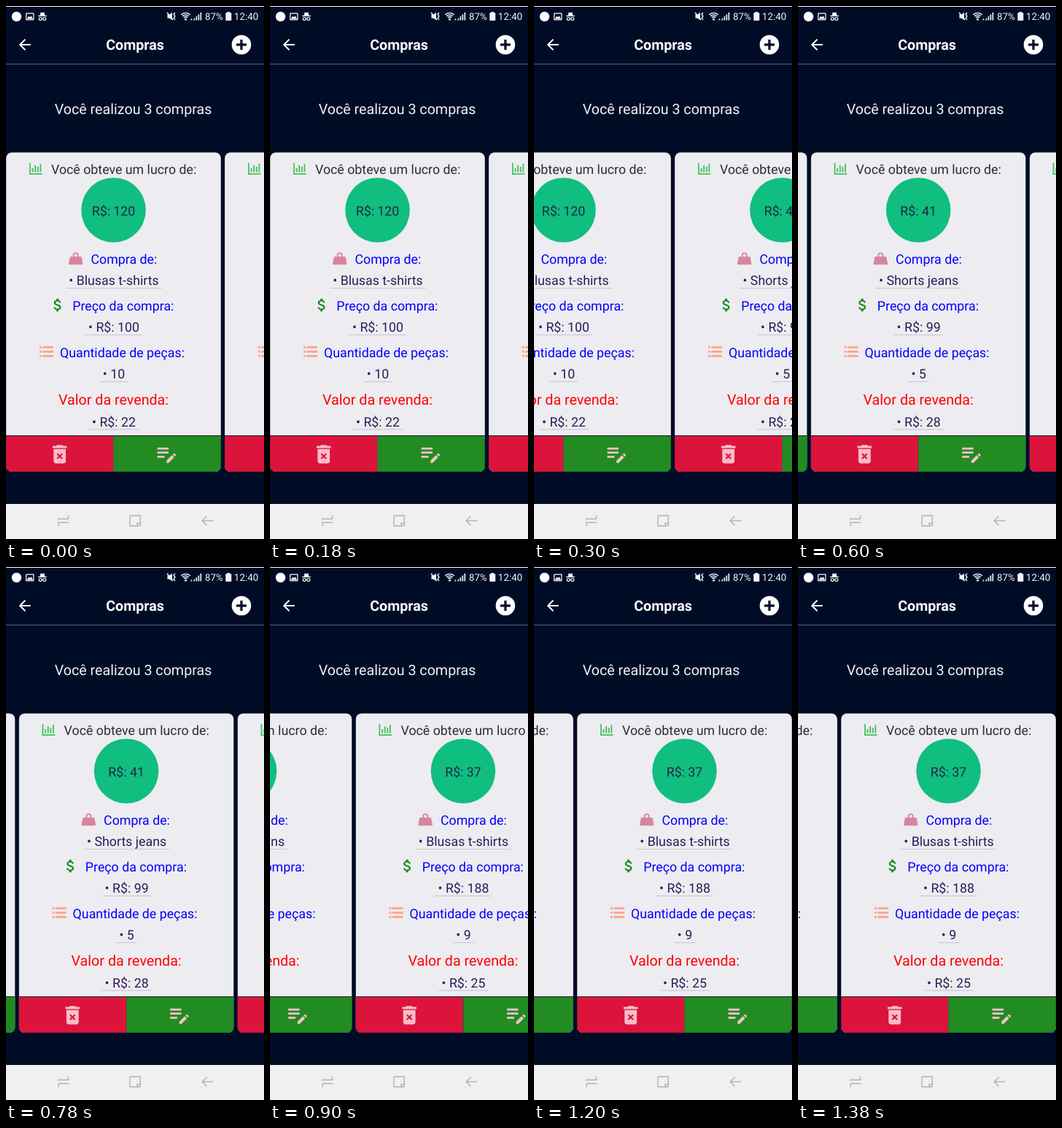
Recreate the animation shown at these times as an HTML page with a canvas. Size 354 px wide and 730 px high, loop 1.5 s.

```html
<!DOCTYPE html>
<html lang="pt-BR">
<head>
<meta charset="utf-8">
<title>Compras</title>
<style>
  html, body { margin: 0; width: 100%; height: 100%; overflow: hidden; background: #000c26; }
  canvas { display: block; width: 354px; height: 730px; }
</style>
</head>
<body>
<canvas id="stage"></canvas>
<script>
const W = 354, H = 730, STEP = 300, PITCH = 300, CARD_W = 295;
const SCROLL = [0, 107, 282.4, 482.5, 541];
const NAVY = '#000c26', INK = '#2f1a55', BLUE = '#0000ff';
const CARDS = [
  { profit: 120, item: 'Blusas t-shirts', price: 100, count: 10, resale: 22 },
  { profit: 41, item: 'Shorts jeans', price: 99, count: 5, resale: 28 },
  { profit: 37, item: 'Blusas t-shirts', price: 188, count: 9, resale: 25 }
];

// Icons on a 24-unit grid
const BACK = new Path2D('M20 11H7.83l5.59-5.59L12 4l-8 8 8 8 1.41-1.41L7.83 13H20v-2z');
const MONEY = new Path2D('M11.8 10.9c-2.27-.59-3-1.2-3-2.15 0-1.09 1.01-1.85 2.7-1.85 1.78 0 2.44.85 2.5 2.1h2.21c-.07-1.72-1.12-3.3-3.21-3.81V3h-3v2.16c-1.94.42-3.5 1.68-3.5 3.61 0 2.31 1.91 3.46 4.7 4.13 2.5.6 3 1.48 3 2.41 0 .69-.49 1.79-2.7 1.79-2.06 0-2.87-.92-2.98-2.1h-2.2c.12 2.19 1.76 3.42 3.68 3.83V21h3v-2.15c1.95-.37 3.5-1.5 3.5-3.55 0-2.84-2.43-3.81-4.7-4.4z');
const TRASH = new Path2D('M6 19c0 1.1.9 2 2 2h8c1.1 0 2-.9 2-2V7H6zM19 4h-3.5l-1-1h-5l-1 1H5v2h14z');
const EDIT = new Path2D('M3 10h11v2H3zM3 6h11v2H3zM3 14h7v2H3zM18.01 12.87l.71-.71c.39-.39 1.02-.39 1.41 0l.71.71c.39.39.39 1.02 0 1.41l-.71.71zM17.3 13.58l-5.3 5.3V21h2.12l5.3-5.3z');
const BAG = new Path2D('M3 6h13.4c.8 0 1.2.4 1.4 1.2L19.4 15.4c.2 1-.3 1.6-1.1 1.6H1.1c-.8 0-1.3-.6-1.1-1.6L1.6 7.2C1.8 6.4 2.200 6 3 6z');

const canvas = document.getElementById('stage');
const ctx = canvas.getContext('2d');
const dpr = window.devicePixelRatio || 1;
canvas.width = W * dpr;
canvas.height = H * dpr;

function rect(x, y, w, h, color) {
  ctx.fillStyle = color;
  ctx.fillRect(x, y, w, h);
}

function roundRect(x, y, w, h, r, color) {
  ctx.fillStyle = color;
  ctx.beginPath();
  ctx.roundRect(x, y, w, h, r);
  ctx.fill();
}

function disc(x, y, r, color) {
  ctx.fillStyle = color;
  ctx.beginPath();
  ctx.arc(x, y, r, 0, Math.PI * 2);
  ctx.fill();
}

function arc(x, y, r, from, to, width, color) {
  ctx.strokeStyle = color;
  ctx.lineWidth = width;
  ctx.beginPath();
  ctx.arc(x, y, r, from * Math.PI, to * Math.PI);
  ctx.stroke();
}

function line(points, width, color) {
  ctx.strokeStyle = color;
  ctx.lineWidth = width;
  ctx.beginPath();
  points.forEach(([x, y]) => ctx.lineTo(x, y));
  ctx.stroke();
}

function poly(points, color) {
  ctx.fillStyle = color;
  ctx.beginPath();
  points.forEach(([x, y]) => ctx.lineTo(x, y));
  ctx.fill();
}

function icon(path, x, y, scale, color) {
  ctx.save();
  ctx.translate(x, y);
  ctx.scale(scale, scale);
  ctx.fillStyle = color;
  ctx.fill(path);
  ctx.restore();
}

function text(str, x, y, color, size = 17.8, align = 'left', weight = 400) {
  ctx.font = `${weight} ${size}px Roboto, sans-serif`;
  ctx.textAlign = align;
  ctx.fillStyle = color;
  ctx.fillText(str, x, y);
}

function value(str, y) {
  const label = '• ' + str;
  text(label, 148, y, INK, 17.8, 'center');
  const w = ctx.measureText(label).width + 8;
  rect(148 - w / 2, y + 4, w, 1, '#c6c6cf');
}

function chartIcon() {
  const c = '#48c45c';
  rect(32, 215, 1.8, 16, c);
  rect(32, 229.2, 17.5, 1.8, c);
  [5.5, 9.5, 7.5, 11.5].forEach((h, i) =>
    rect(35.6 + i * 3.6, 227.6 - h, 1.9, h, c));
}

function bagIcon() {
  const c = '#d9849f';
  icon(BAG, 86, 337.2, 1, c);
  arc(95.7, 341.4, 3, 1, 2, 1.9, c);
  rect(91.8, 341.2, 1.9, 3, c);
  rect(97.8, 341.2, 1.9, 3, c);
}

function listIcon() {
  for (let y = 466; y < 482; y += 6) {
    rect(46, y, 2.9, 2.8, '#ffa48c');
    rect(50.3, y, 14.8, 2.8, '#ffa48c');
  }
}

function buttons() {
  const half = CARD_W / 2;
  rect(0, 588, half, 50, '#dc143c');
  rect(half, 588, half, 50, '#228b22');
  rect(0, 588, CARD_W, 1, '#17202c');
  rect(half - 0.25, 588, 0.5, 50, '#26302a');
  icon(TRASH, 56.9, 597, 1.4, '#f9bcc8');
  line([[70.3, 613.2], [77.1, 620]], 2.2, '#dc143c');
  line([[77.1, 613.2], [70.3, 620]], 2.2, '#dc143c');
  icon(EDIT, 203.4, 596.3, 1.4, '#f9c2cc');
}

function card(data, x) {
  ctx.save();
  ctx.translate(x, 0);
  ctx.beginPath();
  ctx.roundRect(0, 200.5, CARD_W, 437.5, 8);
  ctx.clip();
  rect(0, 200, CARD_W, 438, '#edecf1');

  chartIcon();
  text('Você obteve um lucro de:', 62, 229.5, '#2b2c3b');
  disc(147.5, 279.5, 44.3, '#10be80');
  text('R$: ' + data.profit, 147.5, 286.5, '#22244a', 17.8, 'center');

  bagIcon();
  text('Compra de:', 116.5, 352.7, BLUE);
  value(data.item, 382);

  icon(MONEY, 59.3, 397.7, 0.983, '#128a1c');
  text('Preço da compra:', 91.2, 416.5, BLUE);
  value('R$: ' + data.price, 446);

  listIcon();
  text('Quantidade de peças:', 74, 480.8, BLUE);
  value(data.count, 510);

  text('Valor da revenda:', 147.5, 546, '#ff0000', 19.7, 'center');
  value('R$: ' + data.resale, 575.5);
  buttons();

  ctx.strokeStyle = 'rgba(0, 12, 38, 0.35)';
  ctx.lineWidth = 1;
  ctx.beginPath();
  ctx.roundRect(0, 200.5, CARD_W, 437.5, 8);
  ctx.stroke();
  ctx.restore();
}

function statusBar() {
  const c = '#f2f3f5';
  disc(14.5, 14.5, 6.7, '#fff');

  // Picture
  roundRect(27, 9.5, 11.5, 10, 1.3, c);
  rect(28.3, 10.8, 8.9, 7.4, NAVY);
  poly([[28.6, 17.8], [31.3, 13.6], [33, 15.6], [34.6, 13.2], [37, 17.8]], c);

  // Hat and glasses
  poly([[46.5, 13], [47.7, 8.5], [50, 9.2], [52.3, 8.5], [53.5, 13]], c);
  rect(44, 13, 12, 1.2, c);
  arc(47.2, 17.5, 2, 0, 2, 1.2, c);
  arc(52.8, 17.5, 2, 0, 2, 1.2, c);
  line([[49, 17], [51, 17]], 1, c);

  // Muted speaker
  poly([[221.5, 11.5], [224.5, 11.5], [228, 8.7], [228, 19.3], [224.5, 16.8], [221.5, 16.8]], c);
  line([[221, 9], [229, 19]], 1.5, c);
  line([[232, 9], [230, 11.5], [232, 14], [230, 16.5], [232, 19]], 1.4, c);

  // Wi-Fi
  for (const r of [3.5, 6.3, 9]) arc(246.5, 18.5, r, -0.74, -0.26, 1.6, c);
  disc(246.5, 18.3, 1.5, c);
  rect(253.5, 17.5, 1.8, 2, c);

  // Signal
  for (let i = 0; i < 4; i++) {
    const h = 2.5 + i * 2.7;
    rect(257.5 + i * 3, 19.5 - h, 1.7, h, c);
  }

  text('87%', 273, 18.7, c, 13.3);
  rect(303.5, 8, 3.5, 2, c);
  roundRect(301.3, 9.3, 8, 10.7, 1, c);
  text('12:40', 312.8, 18.7, c, 13.5);
}

function header() {
  icon(BACK, 13.7, 41, 1, '#fff');
  text('Compras', 177, 60.3, '#fff', 19.7, 'center', 700);
  disc(323, 53, 13.3, '#fff');
  rect(316, 51.4, 14, 3.2, NAVY);
  rect(321.4, 46, 3.2, 14, NAVY);
  rect(0, 79, W, 1, '#596071');
  text('Você realizou 3 compras', 174.5, 148, '#f0f1f4', 19.7, 'center');
}

function navBar() {
  const c = '#b2b2b4';
  rect(0, 682, W, 48, '#f0f0f0');
  line([[71, 702.5], [85.5, 702.5], [85.5, 697.5]], 1.5, c);
  line([[86.5, 707.5], [72, 707.5], [72, 712.5]], 1.5, c);
  ctx.strokeStyle = c;
  ctx.lineWidth = 1.4;
  ctx.beginPath();
  ctx.roundRect(169.8, 698, 14.5, 14, 1);
  ctx.stroke();
  line([[184, 708.5], [180, 708.5], [180, 712]], 1.4, c);
  line([[284, 705], [269.5, 705]], 1.4, c);
  line([[275.5, 698.8], [269.3, 705], [275.5, 711.2]], 1.4, c);
}

function draw(now) {
  const scroll = SCROLL[Math.floor(now / STEP) % SCROLL.length];
  ctx.setTransform(dpr, 0, 0, dpr, 0, 0);
  ctx.textRendering = 'geometricPrecision';
  rect(0, 0, W, H, NAVY);
  rect(0, 0, W, 1, '#fff');
  statusBar();
  header();
  CARDS.forEach((data, i) => {
    const x = i * PITCH - scroll;
    if (x > -CARD_W && x < W) card(data, x);
  });
  navBar();
}

const start = performance.now();
function tick() {
  draw(performance.now() - start);
  requestAnimationFrame(tick);
}
tick();
</script>
</body>
</html>
```
